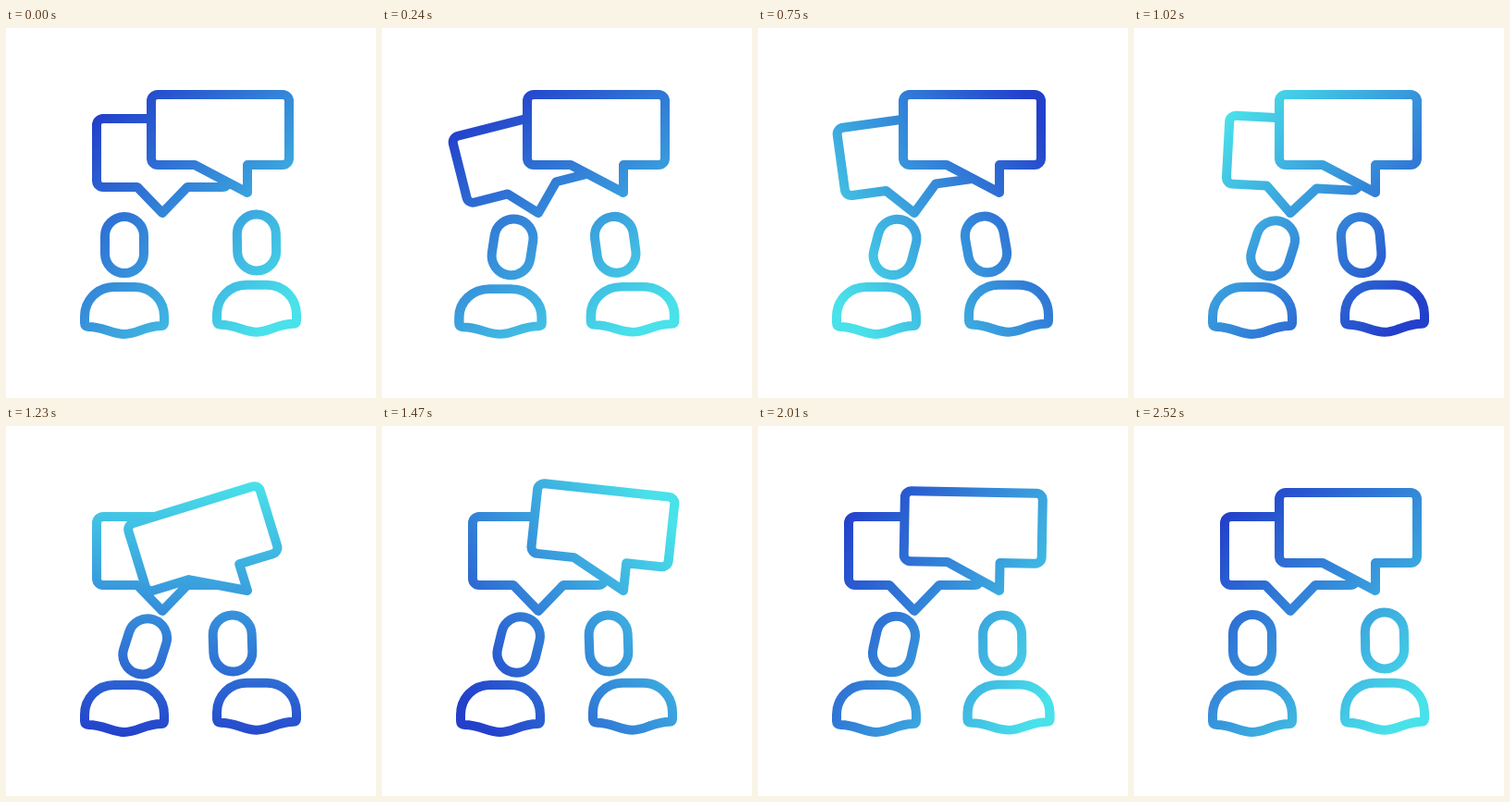
An HTML page that plays this animation: 400 by 400 pixels, repeating every 4550 ms.

```html
<!DOCTYPE html>
<html lang="en">
<head>
<meta charset="utf-8">
<title>Conversation</title>
<style>
  html, body { margin: 0; width: 100%; height: 100%; overflow: hidden; background: #fff; }
  svg { display: block; width: 100vw; height: 100vh; }

  .line { fill: none; stroke: #fff; stroke-width: 10; stroke-linejoin: round; }
  .front { fill: #000; }

  .move { animation: 4550ms cubic-bezier(.333, 0, .667, 1) infinite; }
  .paint { animation-name: spin; animation-timing-function: cubic-bezier(.36, 0, .4, 1); transform-origin: 200px 200px; }
  .back { animation-name: wobble; transform-origin: 169px 200px; }
  .front { animation-name: wobble; animation-delay: 1115ms; transform-origin: 261px 178px; }
  .head-a { animation-name: head-a; transform-origin: 128px 234.5px; }
  .head-b { animation-name: head-b; transform-origin: 271px 232px; }
  .body-a { animation-name: body-a; transform-origin: 128px 331px; }
  .body-b { animation-name: body-b; transform-origin: 128px 331px; }

  @keyframes spin {
    0% { transform: rotate(45deg); }
    55.38%, 100% { transform: rotate(405deg); }
  }

  @keyframes wobble {
    0%, 26.37%, 100% { transform: rotate(0deg); }
    3.52% { transform: rotate(-21deg); }
    9.89% { transform: rotate(15deg); }
    15.71% { transform: rotate(-8.5deg); }
    21.32% { transform: rotate(3.5deg); }
  }

  /* each roll is split in two halves: speed up into the dip, slow down out of it */
  @keyframes head-a {
    0% { transform: none; animation-timing-function: cubic-bezier(.33, 0, .67, .33); }
    4.18% { transform: translate(9px, 3.5px) rotate(6deg); animation-timing-function: cubic-bezier(.33, .67, .67, 1); }
    8.57% { transform: translate(18px, 1px) rotate(12deg); }
    25.3% { transform: translate(22.5px, 4px) rotate(18deg); }
    35.2% { transform: translate(19px, 1.5px) rotate(12.5deg); }
    45.05% { transform: translate(19px, 1.5px) rotate(12.5deg); animation-timing-function: cubic-bezier(.33, 0, .67, .33); }
    48.9% { transform: translate(9.5px, 4.5px) rotate(6deg); animation-timing-function: cubic-bezier(.33, .67, .67, 1); }
    52.75%, 100% { transform: none; }
  }

  @keyframes head-b {
    0% { transform: rotate(-1deg); animation-timing-function: cubic-bezier(.33, 0, .67, .33); }
    3.96% { transform: translate(-12px, 4px) rotate(-5deg); animation-timing-function: cubic-bezier(.33, .67, .67, 1); }
    7.91% { transform: translate(-24px, 1px) rotate(-10deg); }
    17.1% { transform: translate(-24.5px, 2px) rotate(-10deg); }
    26.4% { transform: translate(-26px, 3px) rotate(-2deg); }
    38.9% { transform: translate(-26px, 3px) rotate(-2deg); animation-timing-function: cubic-bezier(.33, 0, .67, .33); }
    42.97% { transform: translate(-14px, 6px) rotate(0deg); animation-timing-function: cubic-bezier(.33, .67, .67, 1); }
    47.03%, 100% { transform: rotate(-1deg); }
  }

  @keyframes body-a {
    0%, 8.57%, 45.05%, 52.75%, 100% { transform: scale(1); }
    4.18% { transform: scale(1.045, .95); }
    48.9% { transform: scale(1.04, .96); }
  }

  @keyframes body-b {
    0%, 14%, 38.9%, 47.25%, 100% { transform: scale(1); }
    3.96% { transform: scale(1.06, .95); }
    9.5% { transform: scale(.985, 1.02); }
    43.7% { transform: scale(1.035, .96); }
  }
</style>
</head>
<body>
<svg viewBox="0 0 400 400">
  <defs>
    <linearGradient id="tone" gradientUnits="userSpaceOnUse" x1="55" y1="200" x2="345" y2="200">
      <stop offset="0" stop-color="#2340cb"/>
      <stop offset="1" stop-color="#49e1ea"/>
    </linearGradient>
    <path id="body" d="M85 312C85 294 99 280 117 280H139C157 280 171 294 171 312V319Q171 322 168 322C150 322 142 331 128 331C114 331 106 323 89 323Q85 323 85 319Z"/>
    <mask id="lines" maskUnits="userSpaceOnUse" x="0" y="0" width="400" height="400">
      <g class="line">
        <path class="move back" d="M105 98H234a7 7 0 0 1 7 7V165a7 7 0 0 1-7 7H196L169 200L142 172H105a7 7 0 0 1-7-7V105a7 7 0 0 1 7-7Z"/>
        <path class="move front" d="M164 72H299a7 7 0 0 1 7 7V141a7 7 0 0 1-7 7H261V178L204 148H164a7 7 0 0 1-7-7V79a7 7 0 0 1 7-7Z"/>
        <rect class="move head-a" x="107" y="204" width="42" height="61" rx="21"/>
        <g class="move body-a"><use href="#body"/></g>
        <rect class="move head-b" x="250" y="201.5" width="42" height="61" rx="21"/>
        <g transform="translate(143 -2.3)">
          <g class="move body-b"><use href="#body"/></g>
        </g>
      </g>
    </mask>
  </defs>
  <g mask="url(#lines)">
    <rect class="move paint" x="-100" y="-100" width="600" height="600" fill="url(#tone)"/>
  </g>
</svg>
</body>
</html>
```
